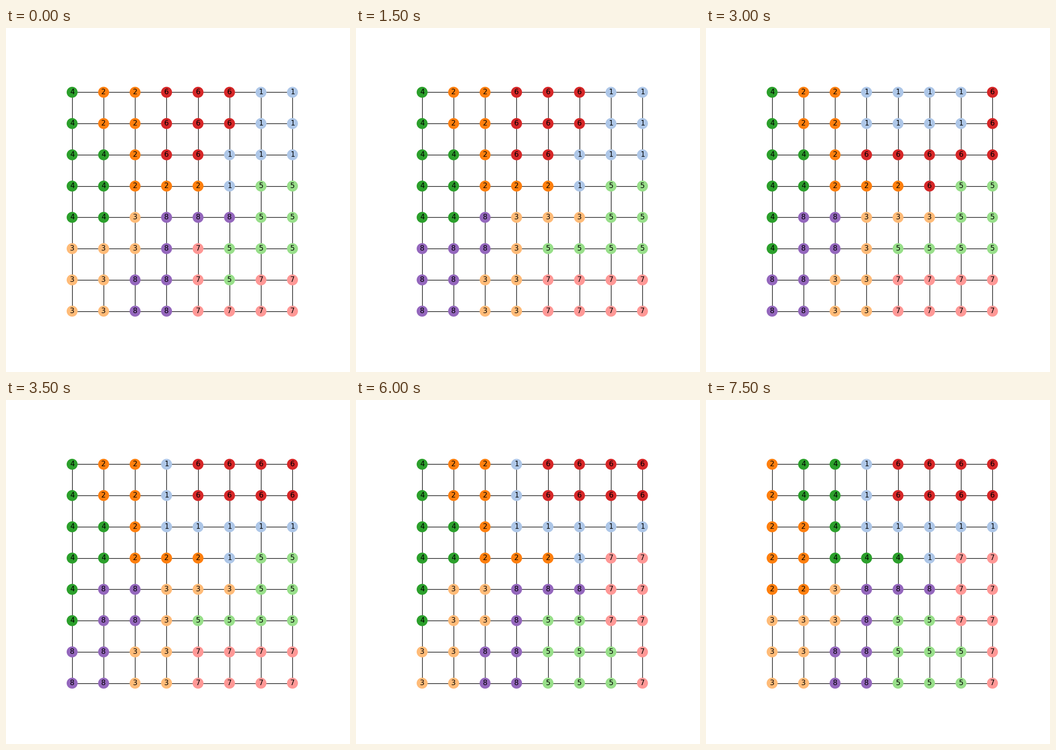
Animation, 748 px wide and 748 px high, one loop 8 s. Source, as a matplotlib script:

```python
import numpy as np
import matplotlib.pyplot as plt
from matplotlib.animation import FuncAnimation
from matplotlib.collections import LineCollection

N = 8
FRAMES, INTERVAL = 16, 500
SIZE = 800  # drawing units across the stage

START = [
    "42266611",
    "42266611",
    "44266111",
    "44222155",
    "44388855",
    "33387555",
    "33887577",
    "33887777",
]

# Frame -> two districts trading labels, or runs of cells (row, column, labels)
STEPS = {
    2: [(5, 4, "5"), (6, 5, "7")],
    3: "38",
    4: [(0, 3, "11116"), (1, 3, "11116"), (2, 3, "66666"), (3, 5, "6")],
    6: [(4, 1, "8"), (5, 0, "4")],
    7: [(0, 3, "16666"), (1, 3, "16666"), (2, 3, "11111"), (3, 5, "1")],
    10: "38",
    11: [(5, 4, "77"), (6, 7, "5"), (7, 7, "5")],
    12: "57",
    13: "24",
    15: [(4, 1, "2"), (5, 0, "3")],
}


def apply_step(grid, step):
    grid = grid.copy()
    if isinstance(step, str):
        a, b = map(int, step)
        is_a, is_b = grid == a, grid == b
        grid[is_a], grid[is_b] = b, a
    else:
        for row, col, labels in step:
            grid[row, col:col + len(labels)] = [int(c) for c in labels]
    return grid


def build_states():
    grid = np.array([[int(c) for c in row] for row in START])
    states = []
    for frame in range(FRAMES):
        if frame in STEPS:
            grid = apply_step(grid, STEPS[frame])
        states.append(grid.ravel())
    return states


def spread(center, extent):
    """Node positions along one axis, with a double 5 % margin."""
    return center + (np.arange(N) - (N - 1) / 2) * extent / ((N - 1) * 1.21)


def snap(v):
    return np.floor(v + 0.5) + 0.5


states = build_states()
xs = spread(410, 620)
ys = spread(404, 616)
gx, gy = (g.ravel() for g in np.meshgrid(xs, ys))
cmap = plt.get_cmap("tab20")

fig = plt.figure(figsize=(8, 8), dpi=93.5, facecolor="white")
ax = fig.add_axes([0, 0, 1, 1])
ax.set_xlim(0, SIZE)
ax.set_ylim(SIZE, 0)
ax.axis("off")

rows = [[(xs[0], y), (xs[-1], y)] for y in snap(ys)]
cols = [[(x, ys[0]), (x, ys[-1])] for x in snap(xs)]
edges = LineCollection(rows + cols, colors="black", linewidths=1, zorder=1)
edges.set_snap(False)
ax.add_collection(edges, autolim=False)

nodes = ax.scatter(gx, gy, s=300, c=cmap(states[0]), linewidths=1, zorder=2)
labels = [
    ax.text(x, y, "", fontsize=12, family="DejaVu Sans", color="black",
            ha="center", va="center", zorder=3)
    for x, y in zip(gx, gy)
]


def draw(frame):
    state = states[frame]
    colors = cmap(state)
    nodes.set_facecolor(colors)
    nodes.set_edgecolor(colors)
    for label, value in zip(labels, state):
        label.set_text(str(value))
    return [nodes, *labels]


anim = FuncAnimation(fig, draw, frames=FRAMES, interval=INTERVAL,
                     repeat=True, repeat_delay=0, blit=False)
plt.show()
```
